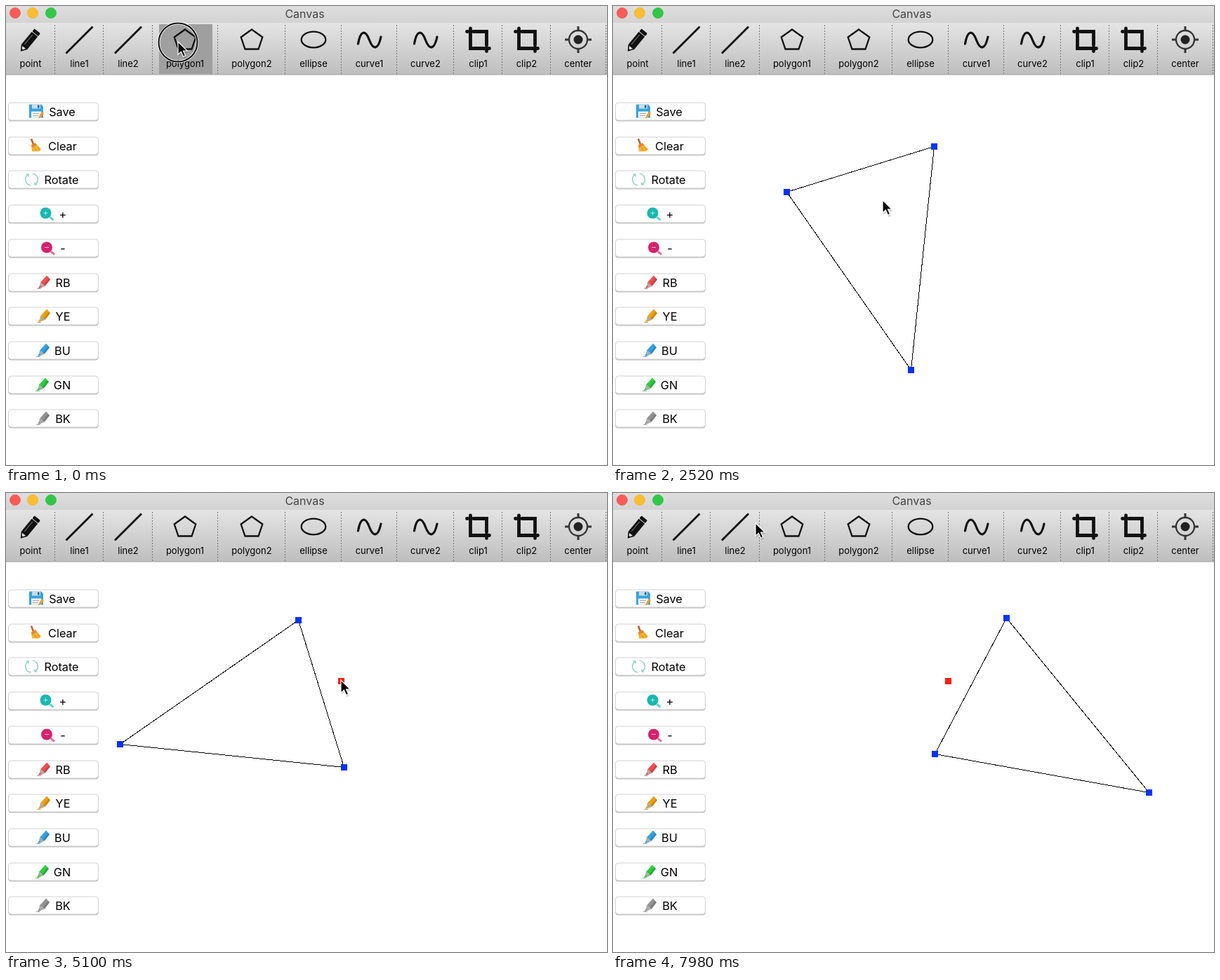
These frames come from a looping animation (856 by 655 pixels, 8 s). An HTML page:

```html
<!DOCTYPE html>
<html lang="en">
<head>
<meta charset="utf-8">
<title>Canvas</title>
<style>
  html, body { margin: 0; width: 100%; height: 100%; overflow: hidden; background: #fff; }
  svg { display: block; width: 856px; height: 655px; font-family: Inter, "Open Sans", sans-serif; }
  text { text-anchor: middle; }
  .label { font-size: 13px; fill: #000; }
  .button text { font-size: 16.3px; fill: #000; }
  .button .face { fill: #fff; stroke: #d2d2d2; }
  .button.down .face { fill: url(#pressed); stroke: #2470d8; }
  .button.down text { fill: #fff; }
  .ink { fill: none; stroke: #111; stroke-width: 2.3; }
  #edges { fill: none; stroke: #000; shape-rendering: crispEdges; }
</style>
</head>
<body>
<svg viewBox="0 0 856 655">
  <defs>
    <linearGradient id="bar" x2="0" y2="1">
      <stop stop-color="#dedede"/><stop offset=".24" stop-color="#d3d3d3"/>
      <stop offset=".25" stop-color="#e4e4e4"/><stop offset="1" stop-color="#bebebe"/>
    </linearGradient>
    <linearGradient id="pressed" x2="0" y2="1">
      <stop stop-color="#6bb3f9"/><stop offset="1" stop-color="#1768e0"/>
    </linearGradient>
    <clipPath id="paper"><path d="M0 99H856V655H0Z"/></clipPath>
  </defs>
  <rect width="856" height="655" fill="#fff"/>
  <g clip-path="url(#paper)">
    <path id="edges"/>
    <g id="dots" fill="#0433ff"></g>
    <rect id="pivot" width="9" height="9" fill="#fb1d0b"/>
  </g>
  <g id="buttons"></g>
  <rect width="856" height="98" fill="url(#bar)"/>
  <path d="M0 98H856" stroke="#a3a3a3"/>
  <circle cx="13" cy="10" r="7.6" fill="#fc5b57" stroke="#e9504b" stroke-width=".6"/>
  <circle cx="38" cy="10" r="7.6" fill="#fdbd2f" stroke="#e9ab2a" stroke-width=".6"/>
  <circle cx="64" cy="10" r="7.6" fill="#31c848" stroke="#2ab540" stroke-width=".6"/>
  <text x="425.5" y="16.5" font-size="16" fill="#444">Canvas</text>
  <rect id="polygonDown" x="218" y="26" width="76" height="71" fill="#9f9f9f"/>
  <rect id="centerDown" x="785" y="26" width="61" height="71" fill="#9f9f9f"/>
  <g id="tools"></g>
  <g id="cursor">
    <g id="ring" fill="none">
      <circle cy="1" r="27.5" stroke="#fff" stroke-width="4" opacity=".8"/>
      <circle cy="1" r="27.5" stroke="#111" stroke-width="2"/>
    </g>
    <path d="M1 2V21L5.5 17L8.5 24L12 22.5L9 15.7H15Z" fill="#000" opacity=".18"/>
    <path d="M0 0V18.2L4.4 14.2L7.5 21.3L10.6 20L7.5 13H13.2Z" fill="#000" stroke="#fff" stroke-width="1.2"/>
  </g>
</svg>
<script>
const $ = id => document.getElementById(id);

// Toolbar
const pentagon = '<path class="ink" d="M0 -14.5L15.3 -3.5L9.5 13.5H-9.5L-15.3 -3.5Z"/>';
const slash = '<path class="ink" style="stroke-width:2.8" d="M-19 19.5L19 -18.5"/>';
const wave = `<path class="ink" style="stroke-width:3.2" stroke-linecap="round"
  d="M-16 6C-12.5 -14 -5.5 -14 0 0.5S12.5 15 16.5 -4"/>`;
const crop = `<path class="ink" style="stroke-width:4.8" stroke-linecap="round"
  d="M-11 -16V12.5H16M-16 -11.5H-15M-7 -11.5H12V8M12 16V16.5"/>`;
const pencil = `<g transform="translate(-2 2) rotate(39.6)" fill="#111">
  <path d="M-5.5 -12.5H5.5V11L0 19L-5.5 11Z"/><rect x="-5.5" y="-18.5" width="11" height="5" rx="1.5"/>
  <path d="M-2 -10V8" stroke="#777" fill="none"/><path d="M-3 11.5H3L1 15H-1Z" fill="#ddd"/></g>`;
const ellipse = '<ellipse class="ink" rx="17.3" ry="11.3"/>';
const target = `<g style="stroke:#333"><circle class="ink" style="stroke:#333" r="13"/><circle r="6.5" fill="#222" stroke="none"/>
  <path stroke-width="3" d="M0 -19V-12M0 19V12M-19 0H-12M19 0H12"/></g>`;

const tools = [
  ['point', 35, pencil], ['line1', 104.5, slash], ['line2', 174, slash],
  ['polygon1', 255, pentagon], ['polygon2', 350, pentagon], ['ellipse', 438, ellipse],
  ['curve1', 517.5, wave], ['curve2', 597.5, wave],
  ['clip1', 672.5, crop], ['clip2', 741.5, crop], ['center', 815, target]
];
const dividers = [69.5, 138.5, 208.5, 301.5, 397.5, 477.5, 556.5, 637.5, 706.5, 775.5, 854.5];
$('tools').innerHTML = tools.map(([name, x, icon]) =>
  `<g transform="translate(${x} 48)">${icon}</g><text class="label" x="${x}" y="87">${name}</text>`).join('') +
  dividers.map(x => `<path d="M${x} 27V97" stroke="#777" stroke-dasharray="2 2"/>`).join('');

// Side buttons
const marker = color => `<g transform="rotate(38)"><path d="M-3 -10.5L4.5 -9V3H-4Z" fill="${color}"/>
  <path d="M1.5 -9.5L4.5 -9V3H1.5Z" fill="#000" opacity=".15"/>
  <path d="M-4 3H4.5L2.5 7H-2Z" fill="#aaa"/><path d="M-2 7H2.5L-1 12Z" fill="${color}"/></g>
  <path d="M-10 9H-4" stroke="#999" stroke-width=".8"/>`;
const lens = (color, sign) => `<path d="M5 5L10 9" stroke="${color}" stroke-width="3" opacity=".65"/>
  <circle cx="-1" cy="-1" r="8" fill="${color}"/><path d="${sign}" stroke="#fff" opacity=".65"/>`;
const floppy = `<path d="M-10 -10H7L10 -7V9H-10Z" fill="#36a3dc"/>
  <path d="M-6 -10H6V-4H-6Z" fill="#c9dce7"/><path d="M2 -9H4.5V-5H2Z" fill="#28638b"/>
  <path d="M-7 0H7V9H-7Z" fill="#f4f4f4"/><path d="M-5 3H4M-5 6H3" stroke="#aaa"/>
  <path d="M4 7L8 0L11 3L6 9L3 10Z" fill="#f29a32"/>`;
const broom = `<path d="M-6 -10L-3 -2" stroke="#b5622c" stroke-width="2.6"/>
  <path d="M-6 -1L0 -4L8 5L5 8L-5 8Z" fill="#f5b432"/><path d="M-6 -1L0 -4L2 -1L-5 3Z" fill="#e8862c"/>
  <path d="M-1 3L1 7M3 2L6 6" stroke="#c9801e"/>`;
const spin = `<g fill="none" stroke="#7cc4ba" stroke-width="1.2"><path d="M-1 8.5A8.5 8.5 0 0 1 -5 -7"/>
  <path d="M1 -8.5A8.5 8.5 0 0 1 5 7"/><path d="M-8 -7.5H-4.5V-4M8 7.5H4.5V4"/></g>`;

const buttons = [
  ['Save', 80, 43, floppy], ['Clear', 80.5, 42, broom], ['Rotate', 79, 36.5, spin],
  ['+', 81, 57.5, lens('#18b8b0', 'M-4 -1H2M-1 -4V2')], ['-', 81, 59, lens('#d3226d', 'M-4 -1H2')],
  ['RB', 81, 54, marker('#ef4f4f')], ['YE', 81, 54, marker('#eca010')],
  ['BU', 80.5, 53, marker('#35a0e0')], ['GN', 80, 52, marker('#2ecc40')], ['BK', 81, 53, marker('#929292')]
];
$('buttons').innerHTML = buttons.map(([name, textX, iconX, icon], i) =>
  `<g class="button" id="button${name}" transform="translate(0 ${Math.round(138 + 48.7 * i)})">
    <rect x="3" y="1.5" width="129" height="25" rx="4.5" fill="#bbb"/>
    <rect class="face" x="3.5" y="0" width="128" height="25" rx="4"/>
    <g transform="translate(${iconX} 12.5)">${icon}</g><text x="${textX}" y="18.5">${name}</text></g>`).join('');

// Timeline: pointer stops as [time, x, y]
const stops = [
  [0, 245, 51], [60, 245, 51], [360, 247, 265], [480, 247, 265], [720, 457, 200], [840, 457, 200],
  [1080, 424, 519], [1200, 424, 519], [1680, 809, 88], [1800, 814, 52], [1920, 814, 52],
  [2520, 384, 277], [2640, 374, 307], [2880, 374, 307], [3300, 92, 257], [3840, 92, 257],
  [4440, 813, 50], [4620, 813, 50], [4980, 477, 267], [5220, 477, 267],
  [5520, 114, 246], [6960, 114, 246], [7980, 203, 43]
];
const corners = [[247, 265, 360], [457, 200, 720], [424, 519, 1080]];
const closeTime = 1200;
const pivots = [[373.5, 307.5, 2640], [476.5, 268, 4980]];
const polygonPresses = [[0, 60]];
const centerPresses = [[1800, 1920], [4500, 4620]];
const firstTurns = [[3300, 3420], [3540, 3660]];
const laterTurns = [[5640, 5760], [5880, 6000], [6120, 6240], [6360, 6420], [6660, 6780]];
const turns = [...firstTurns, ...laterTurns];
const paperClicks = [...corners, ...pivots].map(([, , t]) => [t, t + 60]);
const presses = [...polygonPresses, ...centerPresses, ...turns, ...paperClicks];

const held = (list, t) => list.some(([from, to]) => t >= from && t < to);
const finished = (list, t) => list.filter(([, to]) => t >= to).length;
const show = (el, on) => el.setAttribute('visibility', on ? 'visible' : 'hidden');

function pointer(t) {
  const next = stops.findIndex(s => s[0] > t);
  if (next < 0) return stops.at(-1).slice(1);
  const [a, b] = [stops[next - 1], stops[next]];
  const u = (t - a[0]) / (b[0] - a[0]), k = u * u * (3 - 2 * u);
  return [a[1] + (b[1] - a[1]) * k, a[2] + (b[2] - a[2]) * k];
}

function rotate([x, y], [cx, cy], steps) {
  const a = steps * Math.PI / 4, c = Math.cos(a), s = Math.sin(a);
  return [cx + (x - cx) * c - (y - cy) * s, cy + (x - cx) * s + (y - cy) * c];
}

$('dots').innerHTML = '<rect width="9" height="9"/>'.repeat(3);
const dots = [...$('dots').children];

function place(el, [x, y]) {
  el.setAttribute('x', Math.round(x) - 4);
  el.setAttribute('y', Math.round(y) - 4);
}

function draw(t) {
  const points = corners.map(p =>
    rotate(rotate(p, pivots[0], finished(firstTurns, t)), pivots[1], finished(laterTurns, t)).map(Math.round));
  const count = corners.filter(p => t >= p[2]).length;
  dots.forEach((dot, i) => { place(dot, points[i]); show(dot, i < count); });
  const line = points.slice(0, count).map(([x, y]) => `${x + .5} ${y + .5}`).join('L');
  $('edges').setAttribute('d', line ? 'M' + line + (t >= closeTime ? 'Z' : '') : '');

  const pivot = pivots.filter(p => t >= p[2]).at(-1);
  show($('pivot'), pivot);
  if (pivot) place($('pivot'), pivot);

  show($('polygonDown'), held(polygonPresses, t));
  show($('centerDown'), held(centerPresses, t));
  $('buttonRotate').classList.toggle('down', held(turns, t));
  show($('ring'), held(presses, t));
  $('cursor').setAttribute('transform', `translate(${pointer(t).map(Math.round)})`);
}

const start = performance.now();
function tick() {
  const t = (performance.now() - start) % 8000;
  draw(Math.floor(t / 60) * 60);
  requestAnimationFrame(tick);
}
tick();
</script>
</body>
</html>
```
